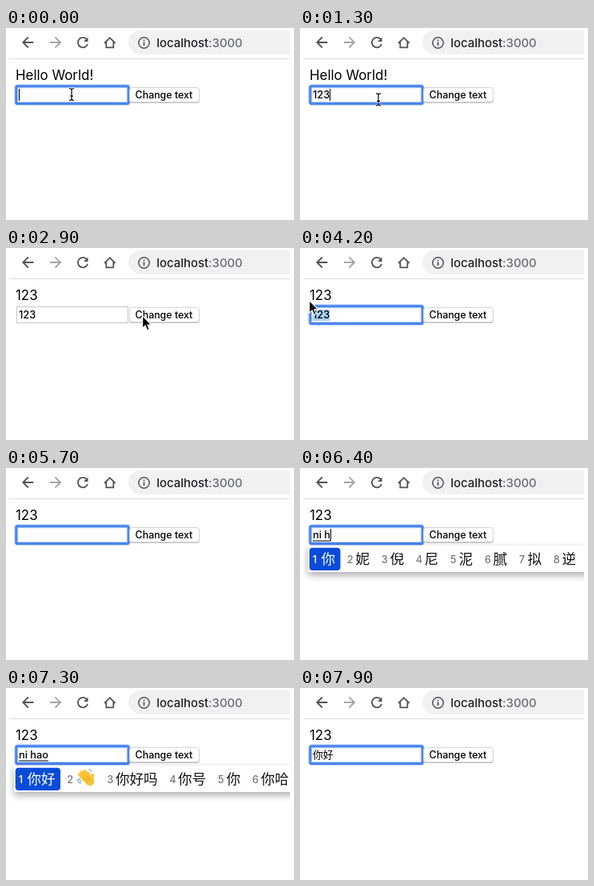
An HTML page that plays this animation: 360x240 px, repeating every 8000 ms.

```html
<!DOCTYPE html>
<html lang="en">
<head>
<meta charset="utf-8">
<title>Change text</title>
<style>
  html, body { margin: 0; width: 100%; height: 100%; overflow: hidden; background: #fff; }
  svg { display: block; width: 360px; height: 240px; }
  text { font-family: Inter, "Noto Sans CJK SC", "Noto Sans CJK", sans-serif; font-size: 12.8px; font-weight: 500; }
  .icon { fill: none; stroke: #505357; stroke-width: 1.8; }
  .hanzi { font-family: "Noto Sans CJK SC", "Noto Sans CJK", sans-serif; font-size: 17.5px; }
  #popup { filter: drop-shadow(0 4px 5px rgba(0, 0, 0, .33)); }
</style>
</head>
<body>
<svg viewBox="0 0 360 240">
  <defs>
    <clipPath id="page"><rect x="4" width="351" height="240"/></clipPath>
    <g id="wave">
      <path d="M9 14L3.500 7.500M11 12L6 4.500M14 11L10 3.500M16 12L14 6M18 15L20 8.500" stroke="#fcc234" stroke-width="3.900" stroke-linecap="round"/>
      <path d="M6.500 12L15 7L20 11Q24 18 18.500 21.500Q13 23.500 6.500 12Z" fill="#fcc234"/>
      <path d="M9 12L14.500 17.500M12 9.500L16.500 15" stroke="#e39a1e" fill="none"/>
      <path d="M15 1Q18 2 18.500 4M1 13Q1.500 17 5 19M3 12Q3.500 15 6 17" stroke="#6f9fc4" stroke-width="1.200" fill="none"/>
    </g>
  </defs>
  <g clip-path="url(#page)">
    <path d="M360 3H168a15 15 0 0 0 0 30H360Z" fill="#f0f1f3"/>
    <path d="M4 38.500H355" stroke="#dcdddf"/>
    <g class="icon">
      <path d="M34.300 18H21.500M27.800 11.500L21.300 18L27.800 24.500"/>
      <path d="M55 18H67.700M61.500 11.500L68 18L61.500 24.500" stroke="#a3a5a8"/>
      <path d="M100.500 13.700A6.200 6.200 0 1 0 102 20"/>
      <path d="M102.500 11.500V17H97Z" fill="#505357" stroke="none"/>
      <path d="M123 19L129.800 12.200L136.600 19M125.300 17.500V24.300H134.300V17.500"/>
      <circle cx="172.500" cy="18.500" r="6.700" stroke-width="1.500"/>
      <path d="M172.500 17.500V22M172.500 14.700V16.200"/>
    </g>
    <text x="188.300" y="24" style="font-size:14.9px" fill="#202124">localhost<tspan fill="#696d72">:3000</tspan></text>

    <text id="title" x="12" y="65" style="font-size:16.9px;font-weight:400"></text>
    <rect x="13.500" y="73.500" width="139" height="20" fill="#fff" stroke="#c4c4c4"/>
    <g id="ring" fill="none" stroke="#4a85ee">
      <rect x="12.800" y="72.800" width="140.400" height="21.700" rx="2" stroke-width="5" opacity=".35"/>
      <rect x="12.800" y="72.800" width="140.400" height="21.700" rx="1.500" stroke-width="3"/>
    </g>
    <rect id="select" y="77" height="14" fill="#abcffb"/>
    <text id="field" x="16" y="88"></text>
    <path id="underline" stroke="#000"/>
    <rect id="caret" y="76" width="1" height="15"/>

    <rect x="154" y="75" width="88" height="19" rx="4" fill="#c4c4c4"/>
    <rect id="button" x="154.500" y="74.500" width="87" height="18" rx="3.500" stroke="#d4d4d4"/>
    <text id="label" x="161.600" y="88" style="font-size:12.4px">Change text</text>

    <g id="popup"></g>
  </g>
  <g id="pointer">
    <path id="arrow" d="M0 0V15.500L3.500 12.300L5.900 18L8.700 16.800L6.300 11.300H11Z" stroke="#fff" stroke-width="1.200"/>
    <g id="beam" fill="none">
      <path d="M-3-7.500Q0-7.500 0-5.500Q0-7.500 3-7.500M0-6V6M-3 7.500Q0 7.500 0 5.500Q0 7.500 3 7.500M-2 2H2" stroke="#fff" stroke-width="2.400"/>
      <path d="M-3-7.500Q0-7.500 0-5.500Q0-7.500 3-7.500M0-6V6M-3 7.500Q0 7.500 0 5.500Q0 7.500 3 7.500M-2 2H2" stroke="#000" stroke-width="1.200"/>
    </g>
  </g>
</svg>
<script>
const LOOP = 8000, STEP = 100, TEXT_X = 16, COMMIT = 7400;
const $ = id => document.getElementById(id);
const set = (id, attrs) => Object.entries(attrs).forEach(([k, v]) => $(id).setAttribute(k, v));
const show = (id, on) => $(id).style.display = on ? '' : 'none';
const lastBefore = (list, t) => list.filter(e => e[0] <= t).pop();

// time, field content
const typing = [
  [0, ''], [300, '1'], [700, '12'], [1000, '123'], [5000, ''],
  [6000, 'n'], [6200, 'ni'], [6400, 'ni h'], [6600, 'ni ha'], [6800, 'ni hao'], [COMMIT, '你好']
];
// time, input method candidates
const candidates = [
  [6000, '你 那 呢 能 年 女 内 南'],
  [6200, '你 妮 倪 尼 泥 腻 拟 逆'],
  [6600, '你哈 你 妮 倪 尼 泥 腻'],
  [6800, '你好 👋 你好吗 你号 你 你哈']
];
// time, x, y
const moves = [
  [0, 82, 83], [1200, 82, 83], [1500, 130, 102], [1800, 195, 97], [2100, 225.6, 83.7],
  [2800, 225.6, 83.7], [2900, 170.6, 84.7], [3200, 122, 84], [3300, 122, 84],
  [3700, 58, 84], [4200, 11.6, 65.6], [LOOP, 11.6, 65.6]
];

function pointerAt(t) {
  const i = moves.findIndex(m => m[0] > t);
  const [t0, x0, y0] = moves[i - 1], [t1, x1, y1] = moves[i];
  const k = (t - t0) / (t1 - t0);
  return [x0 + (x1 - x0) * k, y0 + (y1 - y0) * k];
}

function popupMarkup(words) {
  let x = 16, items = '';
  words.split(' ').forEach((word, i) => {
    const hand = word === '👋', width = hand ? 24.5 : 17.5 * word.length;
    if (!i) items += `<rect x="11.7" y="99.7" width="${width + 21.3}" height="28.3" rx="4" fill="#0a4cd8"/>`;
    items += `<text x="${x - .3}" y="119" fill="${i ? '#777' : '#fff'}">${i + 1}</text>`;
    items += hand
      ? `<use href="#wave" x="${x + 12}" y="100.5"/>`
      : `<text class="hanzi" x="${x + 10.4}" y="120" fill="${i ? '#111' : '#fff'}">${word}</text>`;
    x += width + 25.5;
  });
  return `<rect x="10" y="97" width="400" height="33" rx="2" fill="#fff"/>${items}`;
}

let shownWords;
function drawPopup(t) {
  const open = t >= 6000 && t < COMMIT + 200;
  show('popup', open);
  if (!open) return;
  const words = lastBefore(candidates, t)[1];
  if (words !== shownWords) $('popup').innerHTML = popupMarkup(shownWords = words);
  $('popup').style.opacity = t < COMMIT ? 1 : 1 - (t - COMMIT + STEP) / 200;
}

function draw(t) {
  const [keyTime, content] = lastBefore(typing, t);
  const [x, y] = pointerAt(t);
  const pressed = t === 2200;
  const focused = t < 2200 || t >= 3700;
  const selecting = t >= 3700 && t < 5000;
  const composing = t >= 6000 && t < COMMIT;

  $('title').textContent = t < 2300 ? 'Hello World!' : '123';
  $('field').textContent = content;
  const end = TEXT_X + (content ? $('field').getComputedTextLength() : 0);

  show('ring', focused);
  show('select', selecting);
  const from = Math.min(end, Math.max(TEXT_X, x));
  set('select', { x: from, width: end - from });
  show('underline', composing);
  set('underline', { d: `M16 91H${end}` });
  show('caret', focused && !selecting && (t - keyTime) % 1000 < 500);
  set('caret', { x: Math.round(end - .5) });

  set('button', { fill: pressed ? '#4a8ff5' : '#fff' });
  set('label', { fill: pressed ? '#fff' : '#000' });
  drawPopup(t);

  const inField = x > 13 && x < 153 && y > 73 && y < 95;
  show('pointer', t < 300 || (t >= 1300 && t < 5000));
  set('pointer', { transform: `translate(${x} ${y})` });
  show('beam', inField);
  show('arrow', !inField);
}

function tick() {
  draw(Math.floor(performance.now() % LOOP / STEP) * STEP);
  requestAnimationFrame(tick);
}
tick();
</script>
</body>
</html>
```
